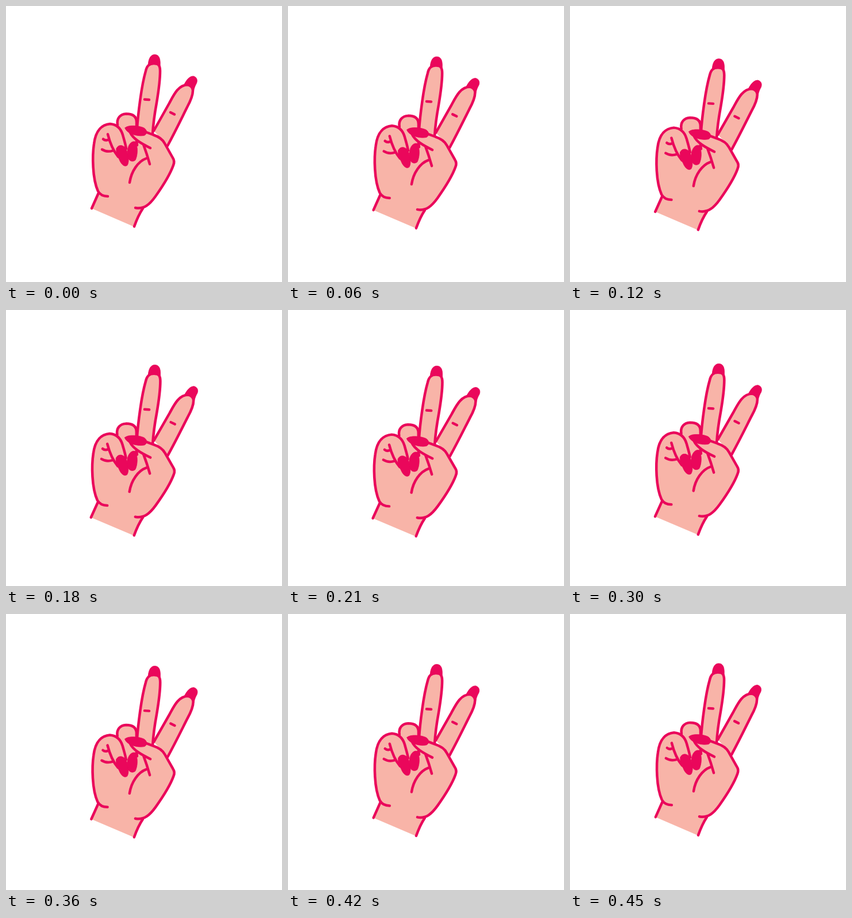
Recreate the animation shown at these times as an HTML page. Size 480 by 480 pixels, loop 480 ms.

```html
<!DOCTYPE html>
<html lang="en">
<head>
<meta charset="utf-8">
<title>Peace hand</title>
<style>
  html, body { margin: 0; width: 100%; height: 100%; overflow: hidden; background: #fff; }
  svg { display: block; width: 100vw; height: 100vh; }
  .skin { fill: #f8b4a8; }
  .line { fill: none; }
  .nail { fill: #ea075b; stroke-width: 0.8; }
  #hand { stroke: #ea075b; stroke-width: 4.5; stroke-linecap: round; stroke-linejoin: round; }
</style>
</head>
<body>
<svg viewBox="0 0 480 480">
  <g id="hand">
    <!-- raised fingers: each nail sits behind a rounded fingertip -->
    <path class="nail" d="M309 138C314 128 319 122 326 122C333 124 334 131 330 137C328 141 327 145 326 149Z"/>
    <path class="skin" d="M281 243C295 217 305 196 315 176C321 165 325 156 325 147C325 142 321 138 316 137C300 137 292 154 284 169L257 217"/>
    <path class="nail" d="M247 106C247 95 250 85 258 84.500C267 84 269 93 268 105Z"/>
    <path class="skin" d="M255 222C256 205 258 190 262 168C265 150 268 130 268 113C268 103 265 100 257 100C249 100 245 104 243 113C239 127 236 144 233.500 162C231 180 229 195 228 213"/>
    <path class="line" d="M241 162.500L249 163M286 185L293 188.500"/>
    <!-- palm and wrist -->
    <path class="skin" stroke="none" d="M149 352L161 325C150 300 150 260 153 240C155 215 168 206 181 205Q189 205 194 209C191 196 199 188 209 187C221 188 228 195 227 209L240 218L256 224Q271 229 276 239L290 264Q294 270 291 277C285 294 272 314 260 331Q250 347 238 352C230 364 226 375 223 384Z"/>
    <path class="line" d="M194 207C192 195 199 188 209 187.500C219 187.500 227 191 227 202V211"/>
    <path class="line" d="M177 331Q165 331 160 322C150 300 150 260 153 240C156 215 168 206 181 205C194 206 200 214 203 224C206 235 208 241 209 248"/>
    <path class="line" d="M161 325L149 352M238 352C230 364 226 375 223 383.500"/>
    <path class="line" d="M225 351C240 354 250 345 260 331C272 314 285 294 291 277Q294 270 290 264L276 239Q271 229 256 224L240 218"/>
    <!-- creases -->
    <path class="line" d="M216 220C221 231 235 239 251 247M227 234L228 242M239 241Q245 257 250 275M244 265C230 270 218 287 215 307"/>
    <path class="line" d="M177 223C180 235 185 250 195 262M169 231.500Q173 235 178 232.500M167 249.500Q176 255 186 251.500"/>
    <!-- folded nails -->
    <path class="nail" d="M207 212C212 206 232 208 240 212C246 216 246 222 241 225C230 228 209 222 207 212Z"/>
    <path class="nail" d="M192 248C195 240 205 241 209 249C213 259 215 270 211 277C206 281 200 275 197 267C193 260 191 254 192 248Z"/>
    <path class="nail" d="M211 253C212 241 218 234 225 236C230 245 229 260 225 268C220 272 214 270 212 263Z"/>
  </g>
</svg>
<script>
  const hand = document.getElementById('hand');
  const LOOP = 480, STEP = 30, PEAK = 216;

  // The hand drops and squashes slightly, then rises back.
  function draw(now) {
    const t = Math.floor((now % LOOP) / STEP) * STEP;
    const p = t < PEAK ? t / PEAK : (LOOP - t) / (LOOP - PEAK);
    const sx = 1 + 0.016 * p, sy = 1 - 0.01 * p;
    hand.setAttribute('transform', `matrix(${sx} 0 0 ${sy} ${240 * (1 - sx)} ${14 * p})`);
    requestAnimationFrame(draw);
  }
  draw(0);
</script>
</body>
</html>
```
